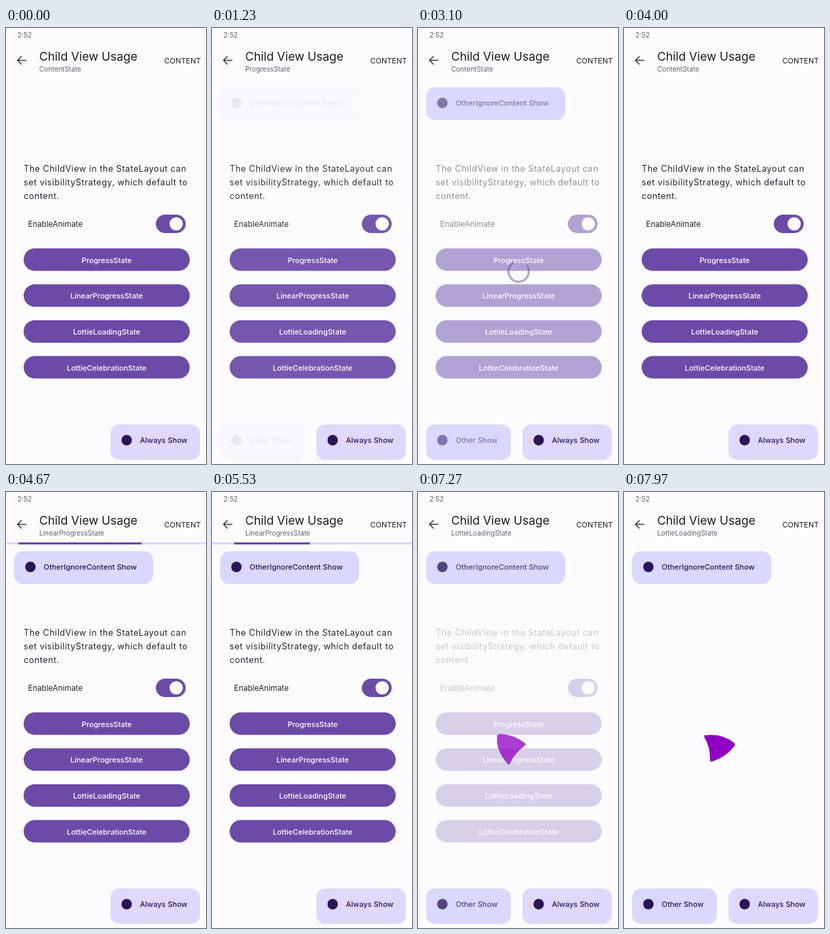
An HTML page for the animation above (8000 ms loop, 295 by 640 pixels).

```html
<!DOCTYPE html>
<html lang="en">
<head>
<meta charset="utf-8">
<style>
  html, body { margin: 0; height: 100%; overflow: hidden; background: #fcfcff; }
  svg { display: block; width: 100%; height: 100%; font: 500 11px Inter, sans-serif; }
  .title { font: 400 17.4px Inter, sans-serif; fill: #1d1b20; }
  .small { font: 400 10px Inter, sans-serif; fill: #65636a; }
  .action { font-weight: 400; fill: #1d1b20; }
  .body { font: 400 12.6px Inter, sans-serif; letter-spacing: .5px; fill: #25232a; }
  .label { font: 400 11.5px Inter, sans-serif; fill: #25232a; }
  .accent { fill: #6b4aa8; }
  .button { fill: #fff; text-anchor: middle; }
  .chip-ink { fill: #2b1458; }
  .chip-line { fill: #dad9cb; }
</style>
</head>
<body>
<svg viewBox="0 0 295 640">
  <rect width="295" height="640" fill="#fcfcff"/>
  <text class="small" x="17" y="14">2:52</text>
  <path d="M30 47.5H17.5M23 41.5l-6 6 6 6" fill="none" stroke="#3c3a41" stroke-width="1.6"/>
  <text class="title" x="49" y="48">Child View Usage</text>
  <text class="small" id="subtitle" x="49" y="64"></text>
  <text class="action" x="233.5" y="52">CONTENT</text>

  <g id="linear">
    <rect y="74" width="295" height="3" fill="#dad8ff"/>
    <rect class="bar accent" y="74" height="3"/>
    <rect class="bar accent" y="74" height="3"/>
  </g>

  <g id="content">
    <text class="body"><tspan x="26" y="211">The ChildView in the StateLayout can</tspan><tspan
      x="26" y="231">set visibilityStrategy, which default to</tspan><tspan x="26" y="251">content.</tspan></text>
    <text class="label" x="32.5" y="292">EnableAnimate</text>
    <rect class="accent" x="221" y="274" width="44" height="27" rx="13.5"/>
    <circle cx="251" cy="287.5" r="9.8" fill="#fff"/>
  </g>

  <circle id="spinner" cx="148.5" cy="357.5" r="15" fill="none" stroke="#6b4aa8"
    stroke-width="3.2" stroke-linecap="round" pathLength="360"/>
  <path id="lottie" d="M-17 -18Q9 -21 25 -7Q28 -4 25 -1Q13 14 -5 20Q-10 22 -10 18Q-10 -1 -18 -14Q-20 -18 -17 -18Z"
    fill="#9000c4"/>
  <g id="chips"></g>
</svg>

<script>
const LOOP = 8000, FADE = 400;
const PROGRESS = 1165, PROGRESS_END = 2900;
const LINEAR = 4205, LINEAR_END = 5950, LOTTIE = 7000;
const $ = id => document.getElementById(id);
const clamp = x => Math.max(0, Math.min(1, x));
const ramp = (t, start, duration) => clamp((t - start) / duration);
const smooth = x => x * x * (3 - 2 * x);
const fade = (t, start) => smooth(ramp(t, start, FADE));

// Cubic bezier (.4, 0, .2, 1)
function standardEase(x) {
  let lo = 0, hi = 1;
  for (let i = 0; i < 20; i++) {
    const s = (lo + hi) / 2, r = 1 - s;
    if (1.2 * r * r * s + .6 * r * s * s + s ** 3 < x) lo = s; else hi = s;
  }
  return smooth(lo);
}

["Progress", "LinearProgress", "LottieLoading", "LottieCelebration"].forEach((name, i) => {
  const y = 323.5 + i * 52.7;
  $("content").insertAdjacentHTML("beforeend",
    `<rect class="accent" x="26" y="${y}" width="245" height="33" rx="16.5"/>
     <text class="button" x="148.5" y="${y + 21}">${name}State</text>`);
});

function addChip(label, x, y, width, height, middle, color) {
  const line = height > 50
    ? `<rect class="chip-line" x="${x + 9}" y="628" width="${width - 18}" height="1"/>` : "";
  $("chips").insertAdjacentHTML("beforeend",
    `<g><rect class="chip-box" x="${x}" y="${y}" width="${width}" height="${height}" rx="13" fill="${color}"/>
     <g class="chip-ink">${line}<circle cx="${x + 24}" cy="${middle}" r="7.7"/>
     <text x="${x + 43.5}" y="${middle + 4}">${label}</text></g></g>`);
  return $("chips").lastElementChild;
}
const ignoreChip = addChip("OtherIgnoreContent Show", 12, 87, 205, 48, 110, "#dad8ff");
const otherChip = addChip("Other Show", 12, 582, 125, 52, 605, "#dad8ff");
addChip("Always Show", 154, 582, 132, 52, 605, "#dfd8ff");

function fadeChip(chip, amount) {
  chip.querySelector(".chip-box").style.opacity = clamp(amount * 2);
  chip.querySelector(".chip-ink").style.opacity = amount;
}

function drawSpinner(t, opacity) {
  let start = t * 1520 / 5400 - 20, end = t * 1520 / 5400;
  for (let cycle = 0; cycle < 4; cycle++) {
    end += 250 * standardEase(ramp(t, cycle * 1350, 667));
    start += 250 * standardEase(ramp(t, cycle * 1350 + 667, 667));
  }
  const spinner = $("spinner");
  spinner.setAttribute("stroke-dasharray", `${end - start} ${360 - end + start}`);
  spinner.setAttribute("transform", `rotate(${start - 90} 148.5 357.5)`);
  spinner.style.opacity = opacity;
}

function drawLinear(time, opacity) {
  const t = Math.max(0, time) % 1800;
  const spans = [
    [ramp(t, 333, 850) ** 1.5, smooth(ramp(t, 0, 750))],
    [ramp(t, 1267, 533), ramp(t, 1000, 567) ** 1.29]
  ];
  document.querySelectorAll(".bar").forEach((bar, i) => {
    const [tail, head] = spans[i];
    bar.setAttribute("x", tail * 295);
    bar.setAttribute("width", Math.max(0, head - tail) * 295);
  });
  $("linear").style.opacity = opacity;
}

function stateName(t) {
  if (t >= LOTTIE) return "LottieLoadingState";
  if (t >= LINEAR && t < LINEAR_END) return "LinearProgressState";
  if (t >= PROGRESS && t < PROGRESS_END) return "ProgressState";
  return "ContentState";
}

function draw(t) {
  const progress = fade(t, PROGRESS) - fade(t, PROGRESS_END);
  const linear = fade(t, LINEAR) - fade(t, LINEAR_END);
  const lottie = fade(t, LOTTIE);
  const away = progress + lottie;

  $("subtitle").textContent = stateName(t);
  $("content").style.opacity = 1 - away;
  fadeChip(ignoreChip, away + linear);
  fadeChip(otherChip, away);
  drawSpinner(t - PROGRESS, progress);
  drawLinear(t - LINEAR, linear);
  $("lottie").setAttribute("transform", `translate(137 375) rotate(${(t - 7970) * .18})`);
  $("lottie").style.opacity = lottie;
}

function tick() {
  draw(performance.now() % LOOP);
  requestAnimationFrame(tick);
}
tick();
</script>
</body>
</html>
```
